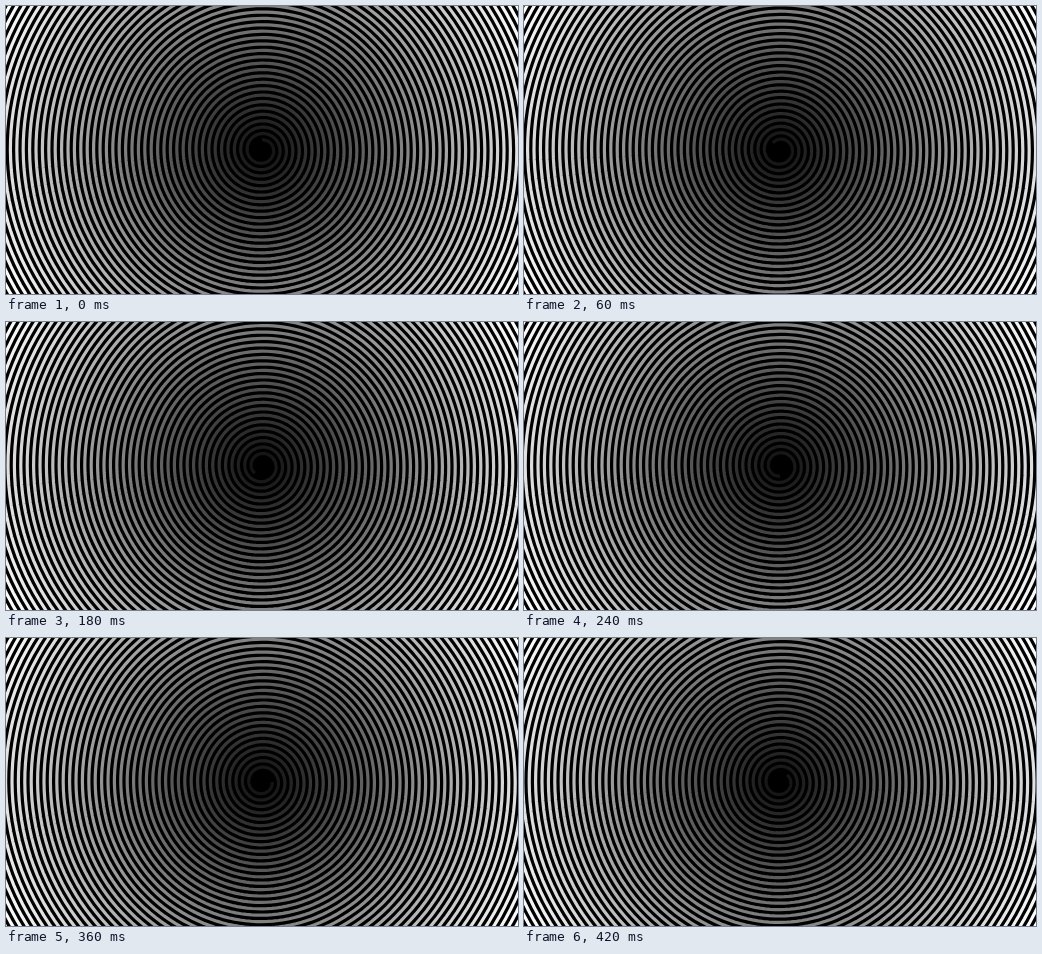
Animation, 512 px wide and 288 px high, one loop 0.48 s. Source, as an HTML page with a canvas:

```html
<!DOCTYPE html>
<html lang="en">
<head>
<meta charset="utf-8">
<title>Turning spiral</title>
<style>
  html, body { margin: 0; width: 100%; height: 100%; overflow: hidden; background: #000; }
  canvas { display: block; }
</style>
</head>
<body>
<canvas id="stage" width="512" height="288"></canvas>
<script>
  const ctx = document.getElementById('stage').getContext('2d');
  const CENTER_X = 256, CENTER_Y = 144;
  const HOLE = 10, PITCH = 6.4, LINE = 3.2, REACH = 304;
  const STEPS = 8, STEP_MS = 60;
  const TAU = Math.PI * 2;

  // Winds outward clockwise, starting straight above the centre.
  function buildSpiral() {
    const path = new Path2D();
    const perTurn = 160;
    const count = (REACH - HOLE) / PITCH * perTurn;
    for (let i = 0; i <= count; i++) {
      const turn = i / perTurn;
      const angle = (turn - 0.25) * TAU;
      const radius = HOLE + PITCH * turn;
      path.lineTo(radius * Math.cos(angle), radius * Math.sin(angle));
    }
    return path;
  }

  const spiral = buildSpiral();
  const shade = ctx.createRadialGradient(0, 0, HOLE, 0, 0, 290);
  shade.addColorStop(0, '#141414');
  shade.addColorStop(1, '#fff');

  function draw(step) {
    ctx.setTransform(1, 0, 0, 1, 0, 0);
    ctx.fillStyle = '#000';
    ctx.fillRect(0, 0, 512, 288);
    ctx.translate(CENTER_X, CENTER_Y);
    ctx.rotate(-step / STEPS * TAU);
    ctx.strokeStyle = shade;
    ctx.lineWidth = LINE;
    ctx.stroke(spiral);
  }

  let start, shown = -1;
  function tick(now) {
    start ??= now;
    const step = Math.floor(Math.max(0, now - start) / STEP_MS) % STEPS;
    if (step !== shown) draw(shown = step);
    requestAnimationFrame(tick);
  }
  draw(0);
  requestAnimationFrame(tick);
</script>
</body>
</html>
```
